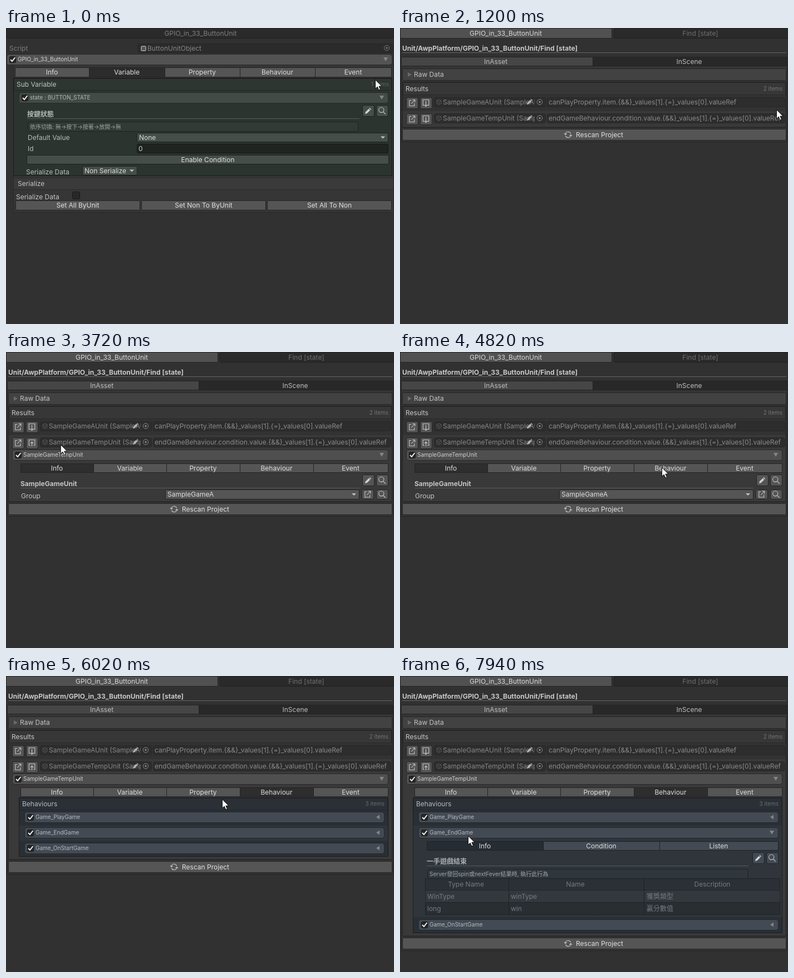
An HTML page with a canvas that plays this animation: 697 px wide and 534 px high, repeating every 8 s.

```html
<!DOCTYPE html>
<html lang="en">
<head>
<meta charset="utf-8">
<title>Inspector</title>
<style>
html, body { margin: 0; width: 100%; height: 100%; overflow: hidden; background: #313131; }
canvas { display: block; }
</style>
</head>
<body>
<canvas id="stage" width="697" height="534"></canvas>
<script>
const ctx = document.getElementById('stage').getContext('2d');
const LOOP = 8000, BG = '#313131', EDGE = '#232323', BUTTON = '#555555';
const FAMILY = 'Inter, "Noto Sans CJK TC", "Noto Sans CJK", sans-serif';
const GREEN = { button: '#464e49', selected: '#2d3530', edge: '#1d221f' };
const BLUE = { button: '#424a53', selected: '#262c33', edge: '#1d2126' };
const GRAY = { button: BUTTON, selected: '#2e2e2e', edge: EDGE };

// ---- drawing helpers (boxes are given by their left, top, right and bottom) ----
function box(l, t, r, b, fill, edge, radius = 0) {
  ctx.beginPath();
  ctx.roundRect(l + .5, t + .5, r - l - 1, b - t - 1, radius);
  if (fill) { ctx.fillStyle = fill; ctx.fill(); }
  ctx.lineWidth = 1;
  ctx.strokeStyle = edge || fill;
  ctx.stroke();
}
function text(s, x, y, color = '#c4c4c4', { size = 12, align = 'left', bold = false } = {}) {
  ctx.font = `${bold ? 'bold ' : ''}${size}px ${FAMILY}`;
  ctx.textAlign = align;
  ctx.fillStyle = color;
  ctx.fillText(s, x, y);
}
const small = (s, x, y, color, align) => text(s, x, y, color, { size: 10, align });
const centered = (s, x, y, color) => text(s, x, y, color, { align: 'center' });
const heading = (s, x, y, color) => text(s, x, y, color, { bold: true });

function poly(points, fill) {
  ctx.beginPath();
  points.forEach(([x, y]) => ctx.lineTo(x, y));
  ctx.closePath();
  ctx.fillStyle = fill;
  ctx.fill();
}
function strokes(path, x, y, color, width = 1.2) {
  ctx.save();
  ctx.translate(x, y);
  ctx.strokeStyle = color;
  ctx.lineWidth = width;
  ctx.stroke(new Path2D(path));
  ctx.restore();
}
function clipped(l, t, r, b, draw) {
  ctx.save();
  ctx.beginPath();
  ctx.rect(l, t, r - l, b - t);
  ctx.clip();
  draw();
  ctx.restore();
}
const line = (l, r, y, color) => { ctx.fillStyle = color; ctx.fillRect(l, y, r - l, 1); };
const down = (x, y, color = '#8a8a8a', w = 4, h = 6) =>
  poly([[x - w, y - h / 2], [x + w, y - h / 2], [x, y + h / 2]], color);
const left = (x, y, color) => poly([[x + 3, y - 4], [x + 3, y + 4], [x - 3, y]], color);

function button(l, t, r, b, label, theme = GRAY) {
  box(l, t, r, b, theme.button, theme.edge, 2);
  if (label) centered(label, (l + r) / 2, (t + b) / 2 + 4, '#e2e2e2');
}
function tabs(edges, t, b, labels, selected, theme, pressed = -1) {
  labels.forEach((label, i) => {
    const dark = i === selected;
    box(edges[i], t, edges[i + 1] + 1, b, dark ? theme.selected : i === pressed ? '#454545' : theme.button, theme.edge);
    centered(label, (edges[i] + edges[i + 1]) / 2, (t + b) / 2 + 4, '#dedede');
  });
}
function dropdown(l, t, r, b, label, theme = GRAY) {
  box(l, t, r, b, theme.button, theme.edge, 2);
  text(label, l + 4, (t + b) / 2 + 4, '#dcdcdc');
  down(r - 10, (t + b) / 2, '#c4c4c4', 4, 4);
}
function checkbox(x, y) {
  box(x, y, x + 12, y + 12, '#262626', '#161616', 2);
  strokes('M2 6 L5 9 L10.5 2', x, y, '#f0f0f0', 2);
}
function foldout(l, t, r, label, fill, edge, color, open = true) {
  box(l, t, r, t + 20, fill, edge, 4);
  checkbox(l + 5, t + 4);
  small(label, l + 20, t + 13, color);
  (open ? down : left)(r - 12, t + 9.5, '#858585', 4, 7);
}

// ---- icons ----
const ICONS = {
  open: 'M9 5.5 H5.5 V15.5 H14.5 V11 M9 11.5 L15 5 M11 4.5 H15.5 V9',
  unfold: 'M7.5 14.5 H5 V4.5 H15.5 V14.5 H13 M10.2 7 V16 M7.5 13.5 L10.2 16.5 L13 13.5',
  fold: 'M7.5 14.5 H5 V4.5 H15.5 V14.5 H13 M10.2 16 V8.5 M7.5 11 L10.2 8 L13 11',
  pressed: 'M8 14.5 H5 V4.5 H15.5 V14.5',
  search: 'M13.5 8.8 a4.6 4.6 0 1 1 -9.2 0 a4.6 4.6 0 1 1 9.2 0 M12.3 12.3 L16.5 16.5'
};
function iconButton(x, y, name, theme = GRAY, dark = false, h = 21) {
  box(x, y, x + 22, y + h, dark ? '#202020' : theme.button, theme.edge, 3);
  if (name === 'pencil') pencil(x + 5, y + 5, 11, '#d2d2d2');
  else strokes(ICONS[name], x + .3, y - (21 - h) / 2, '#c6c6c6', 1.1);
}
function pencil(x, y, s, color) {
  const p = (u, v) => [x + u * s, y + v * s];
  poly([p(0, 1), p(.08, .68), p(.6, .16), p(.84, .4), p(.32, .92)], color);
  poly([p(.67, .09), p(.78, 0), p(1, .22), p(.91, .33)], color);
}
function picker(x, y, color = '#8a8a8a') {
  ctx.beginPath();
  ctx.arc(x, y, 4.7, 0, 7);
  ctx.strokeStyle = color;
  ctx.lineWidth = 1;
  ctx.stroke();
  ctx.beginPath();
  ctx.arc(x, y, 1.7, 0, 7);
  ctx.fillStyle = color;
  ctx.fill();
}

// ---- first page: the unit with its variable ----
function unitPage(t) {
  box(0, 0, 697, 19, '#2a2a2a', '#202020', 2);
  centered('GPIO_in_33_ButtonUnit', 349.5, 14, '#808080');
  text('Script', 6, 41, '#7c7c7c');
  box(237, 28, 695, 45, '#2b2b2b', '#252525', 3);
  box(242, 32, 252, 42, '#8c8c8c', '#8c8c8c', 2);
  strokes('M3.7 2 V8 M6.3 2 V8 M2 3.7 H8 M2 6.3 H8', 242, 32, '#303030', 1);
  text('ButtonUnitObject', 254, 41, '#868686');
  picker(684, 36, '#777');

  box(13, 66, 697, 333, '#363636', '#282828', 2);
  foldout(1, 47, 694, 'GPIO_in_33_ButtonUnit', '#535353', '#2a2a2a', '#d4d4d4');
  tabs([16, 149, 285, 420, 555, 692], 71, 89, ['Info', 'Variable', 'Property', 'Behaviour', 'Event'], 1,
    { ...GRAY, selected: '#2c2c2c' });

  box(13, 90, 694, 267, '#2b342f', '#191c1a');
  box(14, 91, 693, 113, '#2d3631', '#222824');
  text('Sub Variable', 19, 106, '#c0c4c1');
  small('1 items', 688, 105, '#5d655f', 'right');
  foldout(23, 116, 687, 'state : BUTTON_STATE', '#434b46', '#262c28', '#b5bab7');
  heading('按鍵狀態', 38, 160, '#b4b9b6');
  line(38, 635, 163, '#566059');
  iconButton(640, 139, 'pencil', GREEN);
  iconButton(665, 139, 'search', GREEN, t >= 810 && t < 910);
  box(39, 169, 633, 187, '#313a35', '#1e2420', 3);
  small('依序切換: 無->按下->按著->放開->無', 43, 182, '#a0a6a2');
  text('Default Value', 39, 202, '#b9bebb');
  dropdown(235, 189, 687, 206, 'None', GREEN);
  text('Id', 39, 222, '#b9bebb');
  box(235, 209, 687, 226, '#1f2421', '#151816', 2);
  text('0', 238, 222, '#cfcfcf');
  button(37, 229, 688, 246, 'Enable Condition', GREEN);
  text('Serialize Data', 36, 264, '#b9bebb');
  dropdown(137, 249, 236, 266, 'Non Serialize', GREEN);

  box(13, 270, 697, 292, '#3a3a3a', '#2a2a2a');
  text('Serialize', 21, 285);
  text('Serialize Data', 18, 309);
  box(119, 295, 133, 309, '#282828', '#171717', 2);
  button(17, 311, 241, 329, 'Set All ByUnit');
  button(243, 311, 467, 329, 'Set Non To ByUnit');
  button(469, 311, 693, 329, 'Set All To Non');
}

// ---- second page: search results ----
function resultRow(y, name, path, icon, dark) {
  iconButton(11, y, 'open');
  iconButton(36, y, icon, GRAY, dark);
  box(61, y, 262, y + 18, '#2d2d2d', '#272727', 3);
  strokes('M4 0 L8 2 V7 L4 9 L0 7 V2 Z M0 2 L4 4.5 L8 2 M4 4.5 V9', 66, y + 4, '#5c5c5c', .9);
  clipped(77, y, 242, y + 18, () => text(name, 77, y + 13, '#878787'));
  pencil(228, y + 3, 10, '#b4b4b4');
  picker(251, y + 8.5);
  box(264, y, 692, y + 18, '#2d2d2d', '#272727', 3);
  text(path, 267, y + 13, '#8b8b8b');
}

function infoTab() {
  heading('SampleGameUnit', 26, 242, '#c4c4c4');
  line(26, 635, 245, '#5c5c5c');
  iconButton(640, 221, 'pencil');
  iconButton(665, 221, 'search');
  text('Group', 27, 264);
  dropdown(286, 248, 635, 266, 'SampleGameA');
  iconButton(639, 248, 'open', GRAY, false, 18);
  iconButton(665, 248, 'search', GRAY, false, 18);
}

function endGameDetail(narrow) {
  const column = narrow ? 425 : 438, right = narrow ? 680 : 683;
  const dim = '#747a80';
  tabs([48, 257, 466, 679], 298, 315, ['Info', 'Condition', 'Listen'], 0, BLUE);
  heading('一手遊戲結束', 48, 339, '#aab0b6');
  line(48, 626, 342, '#535a62');
  iconButton(633, 318, 'pencil', BLUE);
  iconButton(658, 318, 'search', BLUE);
  box(49, 348, 626, 366, '#30363d', '#1e2227', 3);
  small('Server發回spin或nextFever結果時, 執行此行為', 53, 361, '#a0a6ac');
  box(45, 365, right, 387, '#2b3036', '#1d2125');
  box(45, 386, right, 409, '#33383e', '#23272c');
  box(45, 408, right, 431, '#292e33', '#1f2327');
  ctx.fillStyle = '#1d2125';
  for (const x of [195, column]) ctx.fillRect(x, 365, 1, 66);
  centered('Type Name', 118.5, 380, dim);
  centered('Name', narrow ? 310 : 315, 380, dim);
  centered('Description', narrow ? 541 : 561, 380, dim);
  [['WinType', 'winType', '獲獎類型'], ['long', 'win', '贏分數值']].forEach((cells, i) => {
    [49, 199, column + (narrow ? 11 : 5)].forEach((x, j) => text(cells[j], x, 402 + 22 * i, dim));
  });
}

function behaviourTab(detail, narrow) {
  const row = (y, name, open) => foldout(33, y, 680, name, '#434a53', '#23282d', '#b4bac2', open);
  box(23, 219, 687, 326 + detail, '#2a2f35', '#1b1e22');
  box(24, 220, 686, 242, '#2b3036', '#23272c');
  text('Behaviours', 29, 235, '#b6babf');
  small('3 items', 680, 234, '#666c72', 'right');
  ctx.fillStyle = '#30353c';
  ctx.fillRect(24, 270, 662, 27 + detail);
  row(245, 'Game_PlayGame', false);
  row(273, 'Game_EndGame', detail > 0);
  if (detail) clipped(24, 293, 686, 294 + detail, () => {
    ctx.globalAlpha = detail / 138;
    endGameDetail(narrow);
  });
  row(301 + detail, 'Game_OnStartGame', false);
}

function findPage(t, extra, narrow) {
  const right = narrow ? 684 : 695, split = narrow ? 340 : 346;
  box(2, 52, right + 1, 206 + extra, '#353535', '#232323');
  box(2, 52, split + 1, 69, '#464646', EDGE);
  box(split, 52, right + 1, 69, '#282828', EDGE);
  centered('InAsset', (2 + split) / 2 - 2, 65, '#bebebe');
  centered('InScene', (split + right) / 2 - 1, 65, '#bebebe');
  box(4, 73, 694, 95, '#424242', '#252525', 2);
  poly([[14, 80], [14, 88], [21, 84]], '#6a6a6a');
  text('Raw Data', 25, 88);

  box(4, 97, 694, 180 + extra, '#323232', '#212121');
  box(5, 98, 693, 121, '#373737', '#282828');
  text('Results', 10, 114, '#c8c8c8');
  small('2 items', 687, 113, '#757575', 'right');
  ctx.fillStyle = '#393939';
  ctx.fillRect(5, 150, 688, 28 + extra);
  const pressed = t >= 2910 && t < 3110;
  resultRow(125, 'SampleGameAUnit (SampleAUnit)', 'canPlayProperty.item.{&&}_values[1].{=}_values[0].valueRef', 'unfold');
  resultRow(154, 'SampleGameTempUnit (SampleUnit)', 'endGameBehaviour.condition.value.{&&}_values[1].{=}_values[0].valueRef',
    pressed ? 'pressed' : extra ? 'fold' : 'unfold', pressed);

  if (extra) clipped(5, 175, 693, 179 + extra, () => {
    const behaviour = t >= 4920;
    foldout(11, 176, 687, 'SampleGameTempUnit', '#4f4f4f', '#292929', '#cfcfcf');
    tabs([26, 157, 288, 420, 552, 686], 201, 218, ['Info', 'Variable', 'Property', 'Behaviour', 'Event'],
      behaviour ? 3 : 0, GRAY, t >= 4720 && t < 4820 ? 3 : -1);
    if (behaviour) behaviourTab(Math.max(0, extra - 152), narrow);
    else infoTab();
  });

  button(4, 182 + extra, 694, 203 + extra);
  strokes('M-5 -1 A5 5 0 0 1 4.6 -2 M5 1 A5 5 0 0 1 -4.6 2 M-7 -2.5 L-5 0 L-2.5 -2 M7 2.5 L5 0 L2.5 2',
    302, 192.5 + extra, '#c8c8c8', 1.1);
  text('Rescan Project', 316, 197 + extra, '#e0e0e0');
}

function findHeader() {
  box(0, 0, 381, 19, '#515151', '#252525', 2);
  box(384, 0, 699, 19, '#2a2a2a', '#202020', 2);
  centered('GPIO_in_33_ButtonUnit', 190, 14, '#dadada');
  centered('Find [state]', 539.5, 14, '#6f6f6f');
  heading('Unit/AwpPlatform/GPIO_in_33_ButtonUnit/Find [state]', 4, 41, '#c8c8c8');
  line(4, 694, 44, '#656565');
}

function scrollbar(bottom) {
  ctx.fillStyle = '#292929';
  ctx.fillRect(685, 27, 12, bottom - 27);
  box(686, 41, 696, bottom - 13, '#5f5f5f', '#4c4c4c', 4);
  poly([[687, 35], [695, 35], [691, 31]], '#c4c4c4');
  down(691, bottom - 5, '#c4c4c4', 4, 4);
}

// ---- timeline ----
// [time, height of the unfolded part, bottom of the scroll view while it grows]
const GROWTH = [
  [0, 0], [3110, 68], [3210, 91], [4920, 137, 327], [5020, 152],
  [6740, 255, 424], [6840, 283, 474], [6940, 290]
];
// [start, number of steps, x, y]
const MOVES = [
  [100, 3, 642, 130], [400, 3, 676, 147], [2010, 9, 44, 161], [3620, 9, 470, 208],
  [6020, 1, 388, 222], [6140, 5, 101, 288], [7940, 1, 122, 288]
];

function cursorAt(t) {
  let x = 663, y = 93;
  for (const [start, steps, toX, toY] of MOVES) {
    if (t < start) break;
    const k = Math.min(1, (Math.floor((t - start) / 100) + 1) / steps);
    const eased = k * k * (3 - 2 * k);
    x += (toX - x) * eased;
    y += (toY - y) * eased;
  }
  return [x, y];
}
function drawCursor(x, y) {
  ctx.save();
  ctx.translate(x, y);
  const arrow = new Path2D('M.5 .5 V16.5 L4.2 13 L6.8 19 L9.4 17.9 L6.9 12.1 H12 Z');
  ctx.fillStyle = '#fff';
  ctx.fill(arrow);
  ctx.strokeStyle = '#111';
  ctx.lineWidth = 1;
  ctx.stroke(arrow);
  ctx.restore();
}

function draw(t) {
  ctx.fillStyle = BG;
  ctx.fillRect(0, 0, 697, 534);
  if (t < 1200) unitPage(t);
  else {
    const [, extra, viewBottom] = GROWTH.findLast(([start]) => t >= start);
    findHeader();
    clipped(0, 46, viewBottom ? 685 : 697, viewBottom || 534, () => findPage(t, extra, !!viewBottom));
    if (viewBottom) scrollbar(viewBottom);
  }
  drawCursor(...cursorAt(t));
}

const begin = performance.now();
function tick() {
  draw((performance.now() - begin) % LOOP);
  requestAnimationFrame(tick);
}
tick();
</script>
</body>
</html>
```
